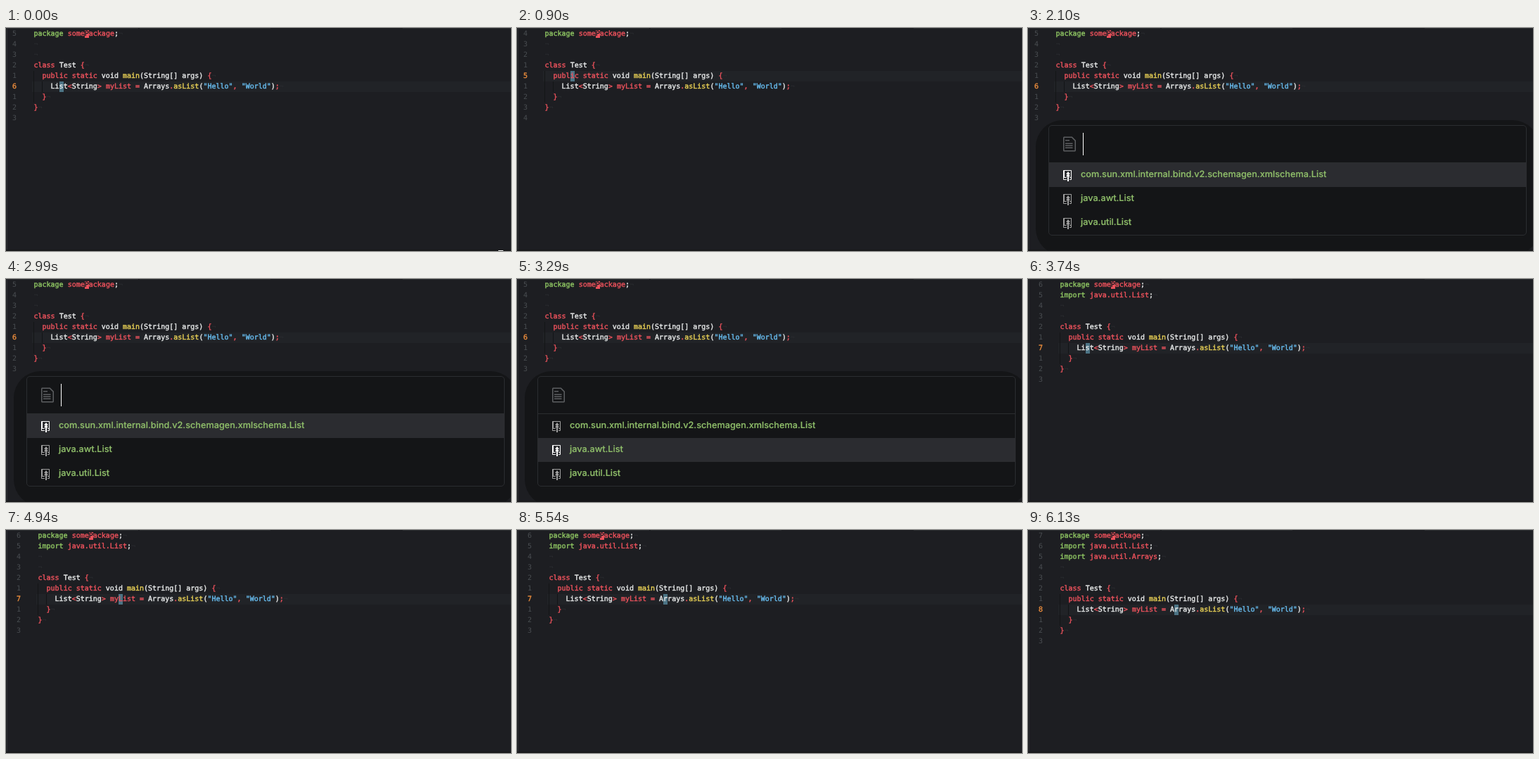
An HTML page that plays this animation: 718x317 px, repeating every 7330 ms.

```html
<!DOCTYPE html>
<html lang="en">
<head>
<meta charset="utf-8">
<title>Java import</title>
<style>
html, body { margin: 0; width: 100%; height: 100%; overflow: hidden; background: #1d1e22; }
#stage { position: relative; width: 718px; height: 317px; overflow: hidden; background: #1d1e22; text-rendering: geometricPrecision; }
#stage div, #stage svg { position: absolute; }
.line, .num { height: 15px; font: 10px/15px "DejaVu Sans Mono", "Noto Sans Mono", monospace; white-space: pre; }
.line, .num.on { -webkit-text-stroke: .4px currentColor; }
.line { color: #e8eaea; }
.num { left: 0; text-align: right; color: #494d51; }
.num.on { color: #e88b3c; }
.g { color: #8fc663; } .r { color: #ec525c; } .y { color: #e8d055; } .b { color: #68bdf0; }
.eol { color: #2b2d31; -webkit-text-stroke: 0; }
.mark { background: #ec525c; color: #1d1e22; }
.guide { width: 1px; background: #131517; }
.edge { background: #2b2d30; }
#row { width: 718px; height: 15px; background: #212327; }
#block { width: 6px; height: 15px; background: #4c7485; }
#shade { left: 11px; top: 131px; width: 716px; height: 192px; border-radius: 38px; background: #141517; }
#box { left: 29px; top: 138px; width: 678px; height: 155px; border: 1px solid #2b2d30; border-radius: 5px; background: #141517; overflow: hidden; }
#rule { left: 0; top: 52px; width: 678px; height: 1px; background: #2b2d30; }
#caret { left: 48px; top: 10px; width: 1px; height: 32px; background: #fff; }
.item { left: 0; width: 678px; height: 34px; color: #8fbe6a; font: 500 12.7px/34px Inter, Roboto, sans-serif; white-space: pre; -webkit-text-stroke: .2px currentColor; }
.item.on { background: #2b2c30; }
.item span { position: absolute; left: 45px; }
#tip { left: 700px; top: 316px; width: 7px; height: 1px; background: #fff; }
</style>
</head>
<body>
<div id="stage">
  <div class="edge" style="left:1px;top:0;width:1px;height:317px"></div>
  <div class="edge" style="left:2px;top:0;width:186px;height:1px"></div>
  <div class="edge" style="left:190px;top:0;width:186px;height:1px"></div>
  <div class="edge" style="left:564px;top:0;width:154px;height:1px"></div>
  <div style="left:0;top:315px;width:718px;height:2px;background:#18191b"></div>
  <div id="row"></div>
  <div id="block"></div>
  <div id="code"></div>
  <div id="popup">
    <div id="shade"></div>
    <div id="box">
      <svg style="left:20px;top:14px" width="18" height="24" viewBox="0 0 12 16" fill="#5c5e61"><path d="M6 5H2V4h4v1zM2 8h7V7H2v1zm0 2h7V9H2v1zm0 2h7v-1H2v1zm10-7.5V14c0 .55-.45 1-1 1H1c-.55 0-1-.45-1-1V2c0-.55.45-1 1-1h7.5L12 4.5zM11 5L8 2H1v12h10V5z"/></svg>
      <div id="caret"></div>
      <div id="rule"></div>
    </div>
  </div>
  <div id="tip"></div>
</div>
<script>
const $ = id => document.getElementById(id);
const LOOP = 7330, CELL = 6.02;

// {class|text} marks a coloured run
const head = "{g|package} {r|some}{mark|P}{r|ackage};";
const imports = ["List", "Arrays"].map(n => `{g|import} {r|java.util.${n}};`);
const body = [
  "", "",
  "{r|class} Test {r|{}",
  "  {r|public static} void {y|main}(String[] args) {r|{}",
  "    List{r|<}String{r|>} {r|myList =} Arrays{r|.}{y|asList}({b|\"Hello\"}{r|,} {b|\"World\"}){r|;}",
  "  {r|}}",
  "{r|}}"
];
const names = ["com.sun.xml.internal.bind.v2.schemagen.xmlschema.List", "java.awt.List", "java.util.List"];

// time, import count, cursor row, cursor column (-1 hides it)
const edits = [
  [0, 0, 5, 6], [900, 0, 4, 6], [1500, 0, 5, 6], [2100, 0, 5, -1],
  [3740, 1, 6, 6], [4340, 1, 6, 7], [4640, 1, 6, 11], [4790, 1, 6, 15],
  [4940, 1, 6, 19], [5090, 1, 6, 24], [5240, 1, 6, 26], [5540, 1, 6, 27],
  [6130, 2, 7, 27]
];
// time, selected item, caret, icon brightness
const picks = [
  [2100, 0, 1, [1, 0, 0]], [2550, 0, 0, [1, 0, 0]], [2990, 0, 1, [1, 0, 0]],
  [3140, 1, 1, [.5, .5, 0]], [3290, 1, 0, [0, 1, 0]],
  [3440, 2, 0, [0, .6, .6]], [3590, 2, 0, [0, 0, 1]]
];

const at = (steps, t) => steps.filter(s => s[0] <= t).pop();
const esc = s => s.replace(/&/g, "&amp;").replace(/</g, "&lt;");
const paint = s => esc(s).replace(/\{(\w+)\|(.+?)\}(?!\})/g, '<span class="$1">$2</span>');

function drawCode(count, row, col) {
  const left = count ? 45.5 : 39.5;
  const lines = [head, ...imports.slice(0, count), ...body];
  const top = i => 1 + 15 * i;
  let html = "";
  for (let i = 0; i <= lines.length; i++) {
    const on = i === row;
    const num = on ? row + 1 : Math.abs(i - row);
    html += `<div class="num${on ? " on" : ""}" style="top:${top(i)}px;width:${left - 24.5}px">${num}</div>`;
    if (i < lines.length)
      html += `<div class="line" style="left:${left}px;top:${top(i)}px">${paint(lines[i])}<span class="eol">¬</span></div>`;
  }
  const guide = (x, i, n) => `<div class="guide" style="left:${left + x}px;top:${top(count + i)}px;height:${15 * n}px"></div>`;
  $("code").innerHTML = guide(-.5, 4, 3) + guide(11.5, 5, 1) + html;
  $("row").style.top = top(row) + "px";
  $("row").style.left = left - 2.5 + "px";
  const block = $("block").style;
  block.display = col < 0 ? "none" : "";
  block.top = top(row) + "px";
  block.left = left + CELL * col + "px";
}

const items = names.map((name, i) => {
  const el = document.createElement("div");
  el.className = "item";
  el.style.top = 53 + 34 * i + "px";
  el.innerHTML = `<svg style="left:20px;top:10px" width="12" height="16" stroke="none"><path d="M10 9H8v7H6V9H4l2.25-3H4l3-4 3 4H7.75L10 9zm1-9H1C.45 0 0 .45 0 1v12c0 .55.45 1 1 1h4v-1H1v-2h4v-1H2V1h9v9H9v1h2v2H9v1h2c.55 0 1-.45 1-1V1c0-.55-.45-1-1-1z"/></svg><span>${name}</span>`;
  $("box").append(el);
  return el;
});

function drawPopup(pick) {
  $("popup").style.display = pick ? "" : "none";
  if (!pick) return;
  const [, sel, caret, glow] = pick;
  $("caret").style.display = caret ? "" : "none";
  items.forEach((el, i) => {
    el.classList.toggle("on", i === sel);
    const v = 160 + 95 * glow[i];
    el.firstChild.style.fill = `rgb(${v},${v},${v})`;
  });
}

let last;
const start = performance.now();
function frame() {
  const t = Math.max(0, performance.now() - start) % LOOP;
  const edit = at(edits, t);
  if (edit !== last) drawCode(...(last = edit).slice(1));
  drawPopup(t < 3740 ? at(picks, t) : null);
  $("tip").style.display = t < 150 ? "" : "none";
  requestAnimationFrame(frame);
}
frame();
</script>
</body>
</html>
```
